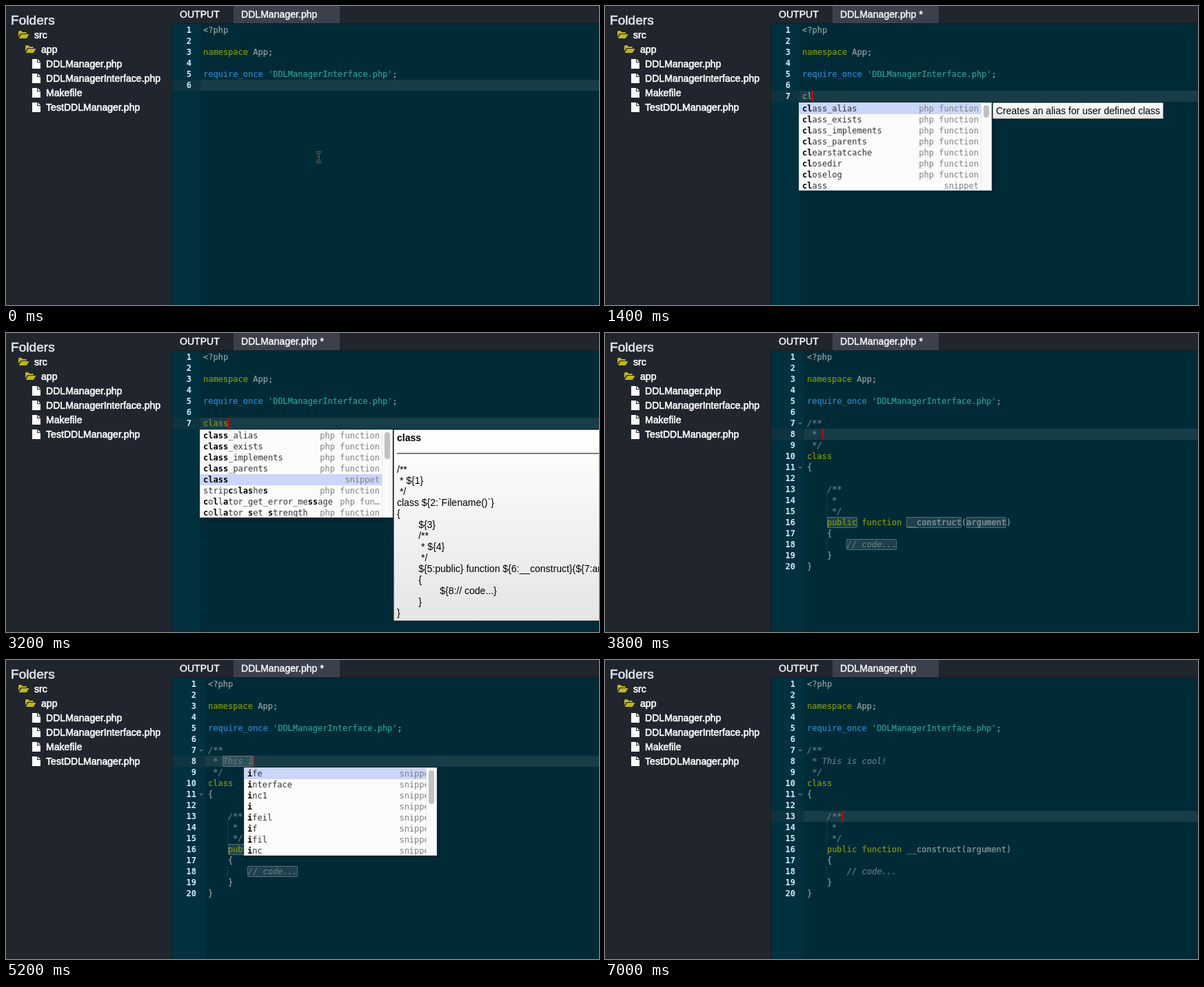
Write an HTML page that moves like this. It is 860 px wide and 434 px high and loops after 7200 ms.

```html
<!DOCTYPE html>
<html>
<head>
<meta charset="utf-8">
<style>
html, body { margin: 0; width: 100%; height: 100%; overflow: hidden; background: #21252d; }
body { position: relative; font: 14px "Liberation Sans", Arial, sans-serif; }
div, svg { position: absolute; box-sizing: border-box; white-space: pre; }
.ui { color: #fff; line-height: 21px; letter-spacing: .05px; -webkit-text-stroke: .6px; }
.top { -webkit-text-stroke: .4px; }
#tab { left: 330px; top: 0; width: 154px; height: 25px; background: #3b404c; }
#editor { left: 240px; top: 25px; right: 0; bottom: 0; background: #002b36; border: solid #181a1f; border-width: 1px 0 0 1px; }
#view { inset: 0; overflow: hidden; }
.mono { font: 12px/16px "DejaVu Sans Mono", monospace; }
.code { color: #93a1a1; -webkit-text-stroke: .2px; }
.num { left: 241px; text-align: right; font-weight: bold; color: #d0edf7; }
.k { color: #859900; } .f { color: #268bd2; } .s { color: #2aa198; }
.c { color: #657b83; font-style: italic; }
.mark { height: 16px; background: rgba(194,193,208,.15); border: 1px dotted rgba(211,208,235,.62); border-radius: 2px; }
.guide { width: 1px; height: 16px; border-left: 1px dotted rgba(147,161,161,.3); }
.fold { border: 3px solid transparent; border-top-color: #526b73; border-bottom: 0; }
.caret { width: 2px; height: 16px; background: #d30102; }
.popup { width: 280px; overflow: hidden; background: #fbfbfb; border: 1px solid #d3d3d3; box-shadow: 2px 3px 5px rgba(0,0,0,.2); color: #333; }
.popup b { color: #000; }
.row { left: 0; right: 0; height: 16px; padding-left: 4px; }
.sel { background: #cad6fa; }
.meta { top: 0; color: #808080; }
.bar { right: 0; top: 0; bottom: 0; width: 15px; background: #fafafa; border-left: 1px solid #e7e7e7; }
.thumb { left: 3px; top: 3px; width: 8px; border-radius: 4px; background: #c1c1c1; }
.tip { padding: 3px 4px; border: 1px solid gray; border-radius: 1px; color: #000; line-height: 16px; box-shadow: 0 1px 2px rgba(0,0,0,.3); background: linear-gradient(#fff, #e5e5e5); }
.tip hr { margin: 14px 0; border: 1px inset #aaa; }
</style>
</head>
<body>
<div class="ui" style="left:7px;top:10px;font-size:19px;color:#e0e6f0">Folders</div>
<div id="tree"></div>
<div id="tab"></div>
<div class="ui top" style="left:252px;top:2px">OUTPUT</div>
<div class="ui top" style="left:341px;top:2px" id="title"></div>
<div id="editor"></div>
<div id="view"></div>
<script>
const CW = 7.2246, LH = 16, TOP = 27;
const $ = id => document.getElementById(id);
const box = (cls, x, y, inner = '', css = '') =>
  `<div class="${cls}" style="left:${x}px;top:${y}px;${css}">${inner}</div>`;

// Folder tree
const folder = '<path fill="#c0b713" d="M0 9V1.5Q0 0 1.5 0H4.5L6 2H10.5Q12 2 12 3.5V4H4.5Q3 4 2.2 5.2ZM.8 11 3.5 6Q4 5 5 5H15.5L12.5 10Q12 11 11 11Z"/>';
const file = '<path fill="#fff" d="M0 0H7V5H12V14H0ZM8 0 12 4H8Z"/>';
$('tree').innerHTML = [
  ['src', 18], ['app', 28], ['DDLManager.php', 38],
  ['DDLManagerInterface.php', 38], ['Makefile', 38], ['TestDDLManager.php', 38]
].map(([name, x], i) => {
  const y = 32 + 21 * i, isFile = x === 38;
  return `<svg width="16" height="14" style="left:${x}px;top:${y + (isFile ? 3 : 4)}px">${isFile ? file : folder}</svg>` +
    box('ui', x + (isFile ? 20 : 23), y, name);
}).join('');

const head = ['<?php', '', 'namespace App;', '', "require_once 'DDLManagerInterface.php';", ''];
const body = ['class ', '{', '', '    /**', '     *', '     */',
  '    public function __construct(argument)', '    {', '        // code...', '    }', '}'];

// Completion lists
const fn = 'php function', sn = 'snippet';
const classFns = ['class_alias', 'class_exists', 'class_implements', 'class_parents'].map(n => [n, fn]);
const clList = [...classFns, ['clearstatcache', fn], ['closedir', fn], ['closelog', fn], ['class', sn]];
const classList = [...classFns, ['class', sn], ['stripcslashes', fn],
  ['collator_get_error_message', 'php fun…'], ['collator_set_strength', fn]];
const iList = ['ife', 'interface', 'inc1', 'i', 'ifeil', 'if', 'ifil', 'inc'].map(n => [n, sn]);

const doc = (name, ...lines) => `<b>${name}</b><hr>${lines.join('\n')}`;
const classDoc = doc('class', '/**', ' * ${1}', ' */', 'class ${2:`Filename()`}', '{', '\t${3}', '\t/**',
  '\t * ${4}', '\t */', '\t${5:public} function ${6:__construct}(${7:argument})', '\t{', '\t\t${8:// code...}', '\t}', '}');
const switchDoc = doc('switch', 'switch (${1:$varName}) {', '\tcase ${2:value}:', '\t\t${3:// code...}',
  '\t\tbreak;', '\t${5:}', '\tdefault:', '\t\t${4:// code...}', '\t\tbreak;', '}');

// Each step changes part of the state from its time on
const closed = { list: null, tip: '' };
const steps = [
  [0, { line: 6, mouse: 1, word: '', ...closed }],
  [400, { line: 7, mouse: 0, caret: 1 }],
  [600, { star: 1 }],
  [1000, { word: 'c' }],
  [1200, { word: 'cl', list: clList, sel: 0, thumb: 18, base: 0, query: 'cl' }],
  [1400, { tip: 'Creates an alias for user defined class' }],
  [1600, { word: 'clas', query: 'clas', list: classList, thumb: 39 }],
  [1800, { word: 'class', query: 'class' }],
  [2200, { sel: 1, tip: 'Checks if the class has been defined' }],
  [2400, { sel: 3, tip: 'Return an array containing the names of all parent classes', caret: 0 }],
  [2600, { sel: 4 }],
  [2800, { tip: classDoc }],
  [3000, { caret: 1 }],
  [3400, { caret: 0 }],
  [3800, { full: 1, marks: 1, line: 8, word: '', caret: 1, ...closed }],
  [4000, { word: 'T' }],
  [4200, { word: 'Th', list: [['switch', sn]], sel: 0, thumb: 0, base: 3, query: 'th' }],
  [4400, { tip: switchDoc }],
  [4800, { word: 'This', ...closed }],
  [5000, { word: 'This ' }],
  [5200, { word: 'This i', list: iList, thumb: 49, base: 8, query: 'i', metaRight: 3 }],
  [5400, { word: 'This is', ...closed }],
  [5600, { word: 'This is co' }],
  [5800, { word: 'This is cool' }],
  [6000, { word: 'This is cool!' }],
  [6400, { line: 9, marks: 0 }],
  [6600, { line: 11 }],
  [6800, { line: 13 }],
  [7000, { star: 0 }]
];

const paint = line => line.replace('<', '&lt;').replace(
  /(\/\*\*|\/\/.*|^ *\*.*)|('.*')|\b(class|namespace|public|function)\b|(require_once)/g,
  (m, c, s, k) => `<span class="${c ? 'c' : s ? 's' : k ? 'k' : 'f'}">${m}</span>`);

// Bold the letters of the query, found in order
function match(name, query) {
  let i = 0;
  return [...name].map(ch => ch === query[i] ? (i++, `<b>${ch}</b>`) : ch).join('');
}

function popup({ list, sel, thumb, base, query, tip, metaRight = 18 }, x0, y) {
  const x = Math.round(x0 + base * CW - 5.3);
  const rows = list.map(([name, meta], i) => box('row' + (i === sel ? ' sel' : ''), 0, i * LH,
    match(name, query) + `<div class="meta" style="right:${metaRight}px">${meta}</div>`)).join('');
  const bar = thumb ? `<div class="bar"><div class="thumb" style="height:${thumb}px"></div></div>` : '';
  const height = Math.min(128, list.length * LH + 2);
  return box('mono popup', x, y, rows + bar, `height:${height}px`) + (tip ? box('tip', x + 281, y, tip) : '');
}

const beamPath = 'd="M2 2.5H4.5L5.5 3.5 6.5 2.5H9M5.5 3.5V15.5M2 16.5H4.5L5.5 15.5 6.5 16.5H9M4 11.5H7"';
const beam = '<svg width="12" height="20" style="left:448px;top:210px" fill="none">' +
  `<path ${beamPath} stroke="#78888c" stroke-width="2.4"/><path ${beamPath} stroke="#04141a" stroke-width="1.2"/></svg>`;

function draw(s) {
  const lines = s.full ? [...head, '/**', ' * ' + s.word, ' */', ...body]
    : s.line > 6 ? [...head, s.word] : head;
  const gutter = s.full ? 48 : 41, x0 = 245 + gutter;
  const yOf = n => TOP + (n - 1) * LH, xOf = col => x0 + col * CW;
  const y = yOf(s.line);
  let out = box('', 241, 26, '', `width:${gutter}px;bottom:0;background:#01313f`) +
    box('', 241, y, '', `width:${gutter}px;height:16px;background:#0d3440`) +
    box('', 241 + gutter, y, '', 'right:0;height:16px;background:#173d47');
  if (s.full) {
    out += [7, 11].map(n => box('fold', 280, yOf(n) + 7)).join('');
    out += [14, 15, 18].map(n => box('guide', 321, yOf(n))).join('');
  }
  if (s.marks)
    out += [[8, 3, s.word.length], [16, 4, 6], [16, 20, 11], [16, 32, 8], [18, 8, 10]].map(([n, col, len]) =>
      len ? box('mark', xOf(col) - .3, yOf(n), '', `width:${len * CW + .6}px`) : '').join('');
  lines.forEach((line, i) => {
    out += box('mono num', 241, yOf(i + 1), i + 1, `width:${gutter - 13}px`) +
      box('mono code', x0, yOf(i + 1), paint(line));
  });
  const col = Math.min(lines[s.line - 1].length, 16);
  if (s.caret) out += box('caret', Math.round(xOf(col)), y);
  if (s.list) out += popup(s, x0, y + LH + 1);
  if (s.mouse) out += beam;
  $('view').innerHTML = out;
  $('title').textContent = 'DDLManager.php' + (s.star ? ' *' : '');
}

const start = performance.now();
let shown = -1;
function tick() {
  const t = (performance.now() - start) % 7200;
  const count = steps.filter(([at]) => at <= t).length;
  if (count !== shown) {
    shown = count;
    draw(Object.assign({}, ...steps.slice(0, count).map(step => step[1])));
  }
  requestAnimationFrame(tick);
}
tick();
</script>
</body>
</html>
```
